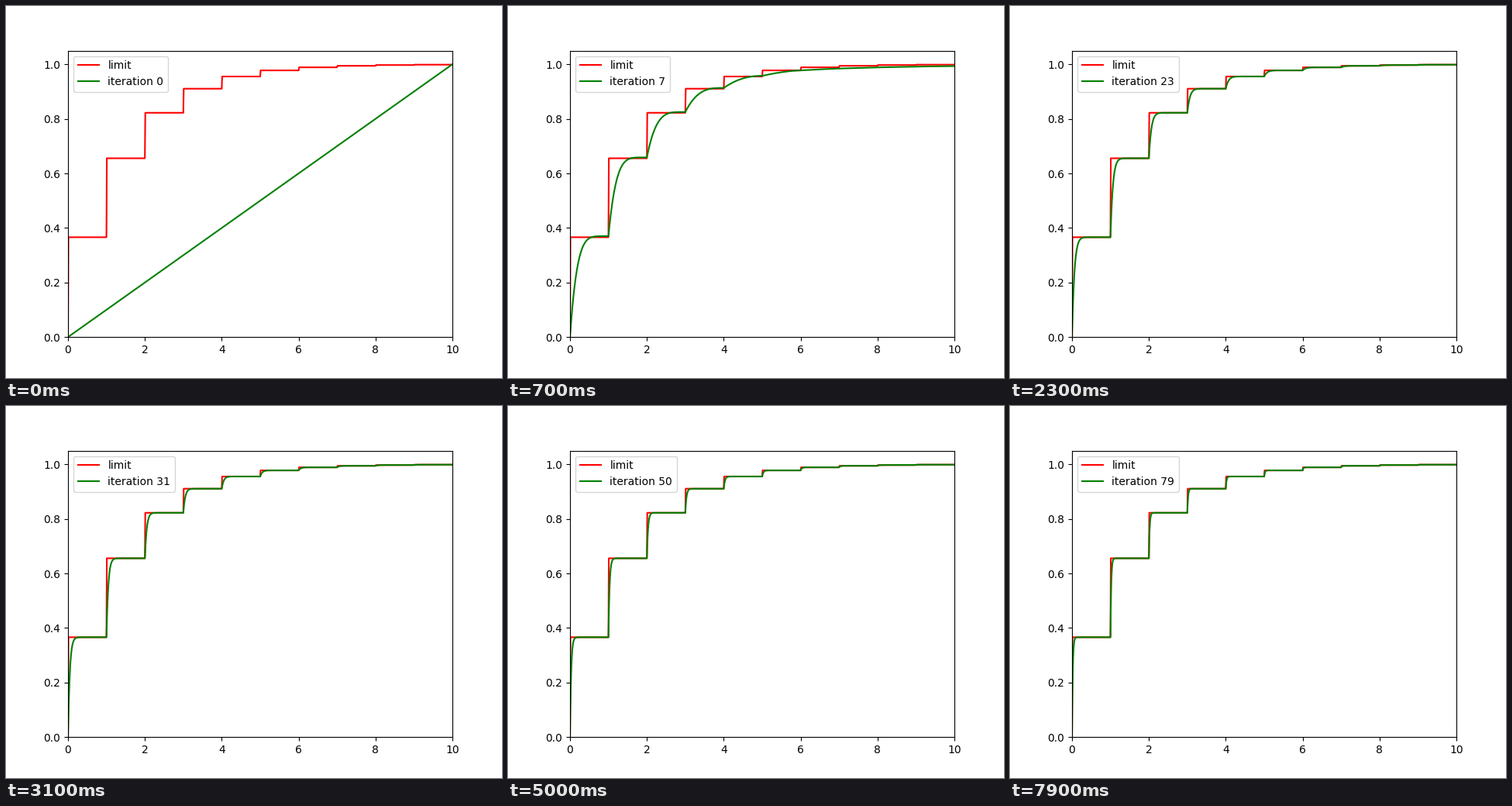
Animation of 640 by 480 pixels, one loop 8000 ms. Source, as a matplotlib script:

```python
import numpy as np
import matplotlib.pyplot as plt
from matplotlib.animation import FuncAnimation

FRAMES, STEP_MS = 80, 100
CELLS = 10

x = np.arange(1001) / 100
k = np.arange(CELLS + 1)

# Limit level at each integer; the tail halves at every step.
head = [1, 0.634, 0.3446, 0.1778, 0.0895]
level = 1 - np.append(head, 0.0448 * 0.5 ** np.arange(CELLS - 4))
limit = level[np.ceil(x).astype(int)]

cell = np.minimum(x.astype(int), CELLS - 1)
frac = x - cell


def knots(n):
    """Values at the integers after n iterations."""
    fade = np.exp(-n / 1.3)
    wobble = 0.0085 * (n / 3) * np.exp(1 - n / 3)
    shift = wobble * np.tanh(6.3 - k) * (k > 0)
    return level + (k / 10 - level) * fade + shift


def curve(n):
    """Each cell rises to its right end, faster with every iteration."""
    g = knots(n)
    power = 1 + 0.65 * n * np.exp(-(2 * cell / max(n, 1)) ** 2)
    return g[cell] + (g[cell + 1] - g[cell]) * (1 - (1 - frac) ** power)


fig, ax = plt.subplots(figsize=(6.4, 4.8), dpi=100)
ax.set_xlim(0, 10)
ax.set_ylim(0, 1.05)
ax.plot(x, limit, color="red", label="limit")
line, = ax.plot(x, curve(0), color="green")


def update(n):
    line.set_ydata(curve(n))
    line.set_label(f"iteration {n}")
    ax.legend(loc="upper left")
    return line,


anim = FuncAnimation(fig, update, frames=FRAMES, interval=STEP_MS,
                     repeat=True, repeat_delay=0)
plt.show()
```
